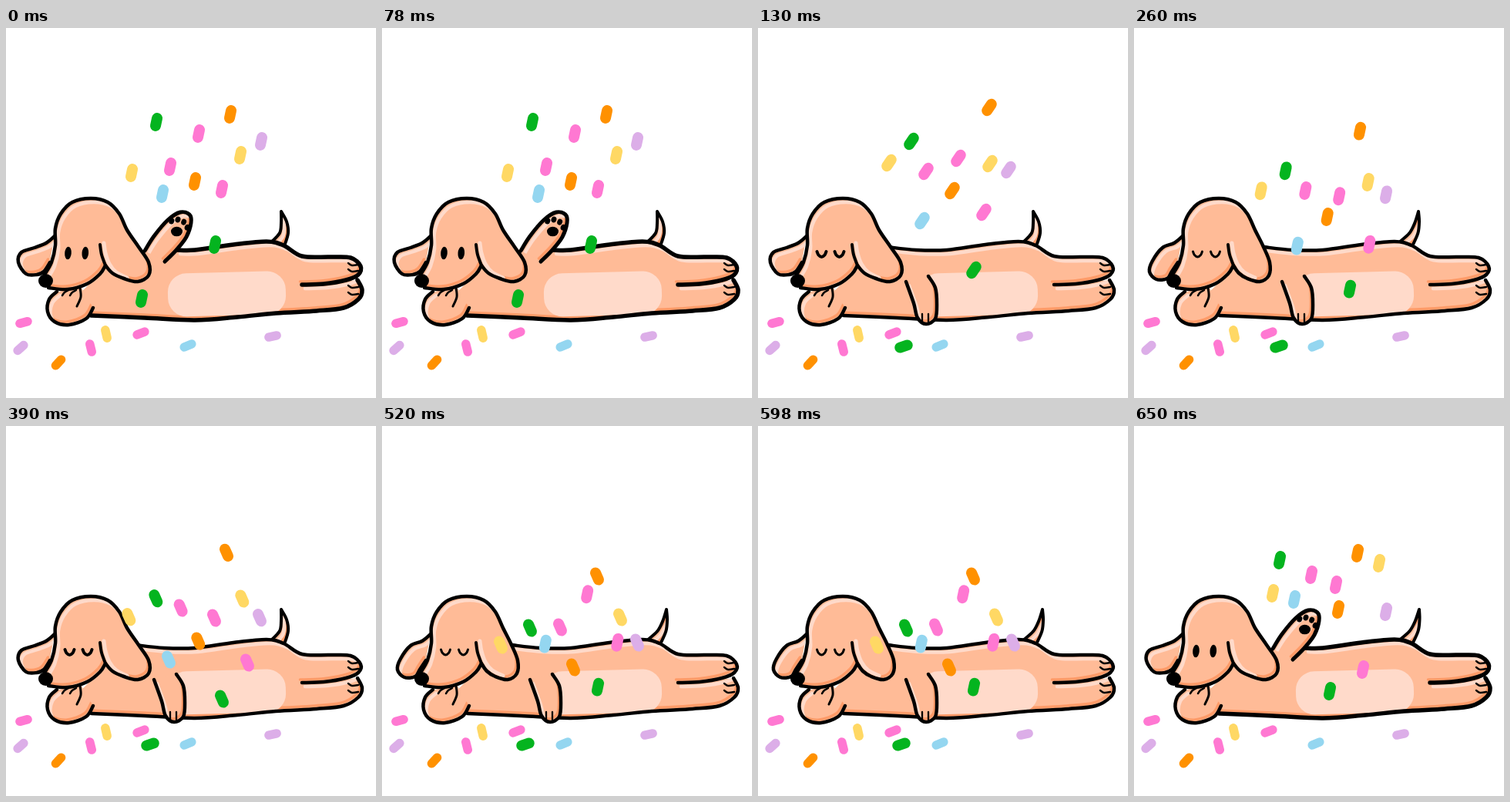
An HTML page that plays this animation: 480x480 px, repeating every 780 ms.

```html
<!DOCTYPE html>
<html lang="en">
<head>
<meta charset="utf-8">
<title>Dog and confetti</title>
<style>
html, body { margin: 0; width: 100%; height: 100%; overflow: hidden; background: #fff; }
svg { display: block; width: 100%; height: 100%; }
path, line { stroke-linecap: round; stroke-linejoin: round; }
</style>
</head>
<body>
<svg id="stage" viewBox="0 0 480 480"></svg>
<script>
const STEP = 130, COUNT = 6, FLOOR = 380;
const SKIN = '#ffbb97', LIGHT = '#ffdaca', SHADE = '#ff9b68', INK = '#000';
const GREEN = '#04b41f', PINK = '#ff78d2', ORANGE = '#ff9100';
const YELLOW = '#ffd864', LILAC = '#dcaee8', BLUE = '#94d6f0';
const stage = document.getElementById('stage');
let clips = 0;

function add(parent, tag, attrs) {
  const el = document.createElementNS('http://www.w3.org/2000/svg', tag);
  for (const key in attrs) el.setAttribute(key, attrs[key]);
  return parent.appendChild(el);
}

const points = text => text.trim().split(/\s+/).map(s => s.split(',').map(Number));

// Smooth path through "x,y x,y ..."; a bar starts a new curve with a sharp corner.
function curve(text) {
  return text.split('|').map((part, n) => {
    const p = points(part);
    let d = (n ? 'L' : 'M') + p[0];
    for (let i = 0; i < p.length - 1; i++) {
      const a = p[i - 1] || p[i], b = p[i], c = p[i + 1], e = p[i + 2] || c;
      const c1 = b.map((v, k) => v + (c[k] - a[k]) / 6);
      const c2 = c.map((v, k) => v - (e[k] - b[k]) / 6);
      d += `C${c1} ${c2} ${c}`;
    }
    return d;
  }).join('');
}

const stroke = (g, d, width, color = INK, shift = '0 0') =>
  add(g, 'path', { d, fill: 'none', stroke: color, 'stroke-width': width, transform: `translate(${shift})` });
const line = (g, text, width) => stroke(g, curve(text), width);
const oval = (g, cx, cy, rx, ry, turn = 0) =>
  add(g, 'ellipse', { cx, cy, rx, ry, transform: `rotate(${turn} ${cx} ${cy})` });

// Filled shape, lit from the top left; the edges are inked, the inner points only close the fill.
function solid(g, edges, inner, weight, detail) {
  const area = curve([...edges, ...inner].join('|')) + 'Z';
  const rim = edges.map(curve).join('');
  const id = 'clip' + clips++;
  add(add(g, 'clipPath', { id }), 'path', { d: area });
  const paint = add(g, 'g', { 'clip-path': `url(#${id})` });
  add(paint, 'path', { d: area, fill: SKIN });
  stroke(paint, rim, 3.5, SHADE, '-2.5 -4');
  stroke(paint, rim, 4.5, LIGHT, '4 5');
  if (detail) detail(paint);
  stroke(g, rim, weight);
}

function drawTail(g, { sway }) {
  const tip = `${357 + sway},238`;
  solid(g, [
    `344,278 ${355 + sway * .2},266 ${357 + sway * .6},253 ${tip}`,
    `${tip} ${364 + sway * .5},251 ${366 + sway * .2},266 361,283`
  ], [], 4);
}

function drawBody(g, { awake }) {
  const back = (awake ? '222,288' : '168,284 205,288')
    + ' 245,288 295,281 338,277 360,282 384,296 420,297 447,298 460,309 457,320 441,327 412,332 384,333';
  const front = '456,327 462,340 457,352 438,363 403,367 350,370 300,375 245,379 180,376 111,373';
  const neck = awake ? ['95,345', '140,300', '180,290'] : ['95,345', '140,300'];
  solid(g, [back, front], neck, awake ? 5.5 : 4.5, paint => add(paint, 'rect', {
    x: 210, y: 317, width: 153, height: 56, rx: 24, fill: LIGHT, transform: 'rotate(-1.5 286 345)'
  }));
  for (const y of [305, 313, 334, 343]) line(g, `444,${y} 449,${y + 3} 457,${y + 2}`, 2.5);
}

function drawWave(g) {
  solid(g, ['180,289 192,270 210,249 226,239 238,242 240,253 234,271 221,288 206,303'], [], 5);
  oval(g, 221.5, 264, 7.5, 6.3);
  for (let i = 0; i < 4; i++) {
    const a = (-122 + 36 * i) * Math.PI / 180;
    oval(g, 222 + 13.5 * Math.cos(a), 262 + 13.5 * Math.sin(a), 3.4, 4, 20);
  }
}

function drawRest(g) {
  solid(g, ['221,322 230,337 232,358 230,377 218,384 207,376 202,357 192,329'], [], 4.5);
  for (const x of [213, 221]) line(g, `${x},371 ${x},381`, 2.3);
}

function drawHand(g) {
  solid(g, ['113,363 104,377 82,385 63,381 54,368 56,352 66,342'], ['98,337'], 4.5);
  for (const x of [73, 83]) line(g, `${x},347 ${x + 3},343 ${x + 8},340`, 2.5);
  line(g, '96,337 97,349 92,361', 3);
}

function drawHead(g, { awake, droop }) {
  const d = droop;
  solid(g, [`63,270 52,279 37,285 ${20 + 4 * d},${291 + 11 * d} ${16 + 4 * d},${304 + 12 * d}
    ${26 + 3 * d},${319 + 7 * d} ${40 + 3 * d},${320 + 5 * d} 49,316 57,304`], [], 4.5);

  const face = '50,320 59,304 64,282 64,260 71,241 86,226 110,221 132,226 147,241';
  const ear = `157,262 ${172 - 4 * d},284 ${185 - 9 * d},304 ${185 - 10 * d},321
    ${171 - 8 * d},329 ${153 - 6 * d},325 ${138 - 2 * d},318 129,308`;
  const jaw = '129,308 122,319 105,332 80,339 55,337';
  const fold = '122,281 124,294 129,308';
  solid(g, [`${face} ${ear} | ${jaw}`], [], 4.5, paint =>
    stroke(paint, curve(`${fold} 138,319 152,326`), 5, LIGHT, '5 -2'));
  line(g, fold, 4);
  oval(g, 51.5, 328, 9.5, 9);

  if (awake) {
    for (const x of [80.5, 102.8]) oval(g, x, 292, 4.3, 8.3, 4);
  } else {
    for (const x of [82.5, 105.5])
      line(g, `${x - 6},290 ${x - 4},294.5 ${x},297 ${x + 4},294.5 ${x + 6},290`, 4 - d);
  }
}

function makeDog(pose) {
  const g = add(stage, 'g', {});
  drawTail(g, pose);
  drawBody(g, pose);
  (pose.awake ? drawWave : drawRest)(g);
  drawHand(g);
  drawHead(g, pose);
  return g;
}

const dogs = [
  { awake: true, droop: 0, sway: 0 },
  { awake: false, droop: 0, sway: 0 },
  { awake: false, droop: 1, sway: 12 },
  { awake: true, droop: 0, sway: 13 }
].map(makeDog);

// Asleep, the dog breathes between two poses; it wakes for the first and last step.
const dogAt = step => step === 0 ? 0 : step === COUNT - 1 ? 3 : 2 - step % 2;

function blob(color, width, length) {
  const half = (length - width) / 2;
  return add(stage, 'line', { y1: -half, y2: half, stroke: color, 'stroke-width': width });
}
const place = (el, x, y, lean) => el.setAttribute('transform', `translate(${x} ${y}) rotate(${lean})`);

// Key points: before the fall, its top, its bottom, after it. Without the last, the piece vanishes.
const falling = [];
const drop = (color, keys, bounces = false) =>
  falling.push({ el: blob(color, 14, 24), keys: points(keys), bounces });

drop(ORANGE, '291,112 300,103 279,195 290,165');
drop(GREEN, '195,122 199,147 192,262 189,174');
drop(LILAC, '331,147 325,184 331,281 327,241');
drop(YELLOW, '304,165 301,176 309,248 318,178');
drop(YELLOW, '163,188 170,175 154,284 180,217');
drop(PINK, '213,180 218,186 231,261 230,193');
drop(ORANGE, '245,199 252,211 248,313 265,238');
drop(PINK, '250,137 260,169 270,249 262,206', true);
drop(PINK, '280,209 293,239 313,307 297,316', true);
drop(BLUE, '203,215 213,250 211,303 208,225', true);
drop(GREEN, '271,281 280,314 280,354 254,344', true);
drop(GREEN, '176,351 189,413 186,413');

const lie = (color, x, y, lean) => place(blob(color, 11.5, 22), x, y, lean);
lie(PINK, 23, 382, 75);
lie(LILAC, 19, 415, 48);
lie(YELLOW, 130, 397, -13);
lie(PINK, 110, 415, -14);
lie(PINK, 175, 396, 69);
lie(ORANGE, 68, 434, 43);
lie(BLUE, 236, 412, 67);
lie(LILAC, 346, 400, 78);

function moveDrop({ el, keys, bounces }, now) {
  const [before, top, bottom, after] = keys;
  const step = bounces && now === 4 ? 2 : now;
  const t = bounces ? ((step - 1) / 2) ** .7 : (step - 1) / 3;
  const at = step === 0 ? before
    : step === COUNT - 1 ? after
    : top.map((v, k) => v + (bottom[k] - v) * t);
  el.setAttribute('display', at ? 'inline' : 'none');
  if (!at) return;
  const tumble = 2 + 32 * Math.cos((step - 1) * 2 * Math.PI / 5);
  place(el, at[0], at[1], at[1] > FLOOR ? 72 : tumble);
}

function draw(time) {
  const step = Math.floor(time / STEP) % COUNT;
  dogs.forEach((dog, i) => dog.setAttribute('display', i === dogAt(step) ? 'inline' : 'none'));
  for (const piece of falling) moveDrop(piece, step);
}

const start = performance.now();
function tick() {
  draw(performance.now() - start);
  requestAnimationFrame(tick);
}
tick();
</script>
</body>
</html>
```
